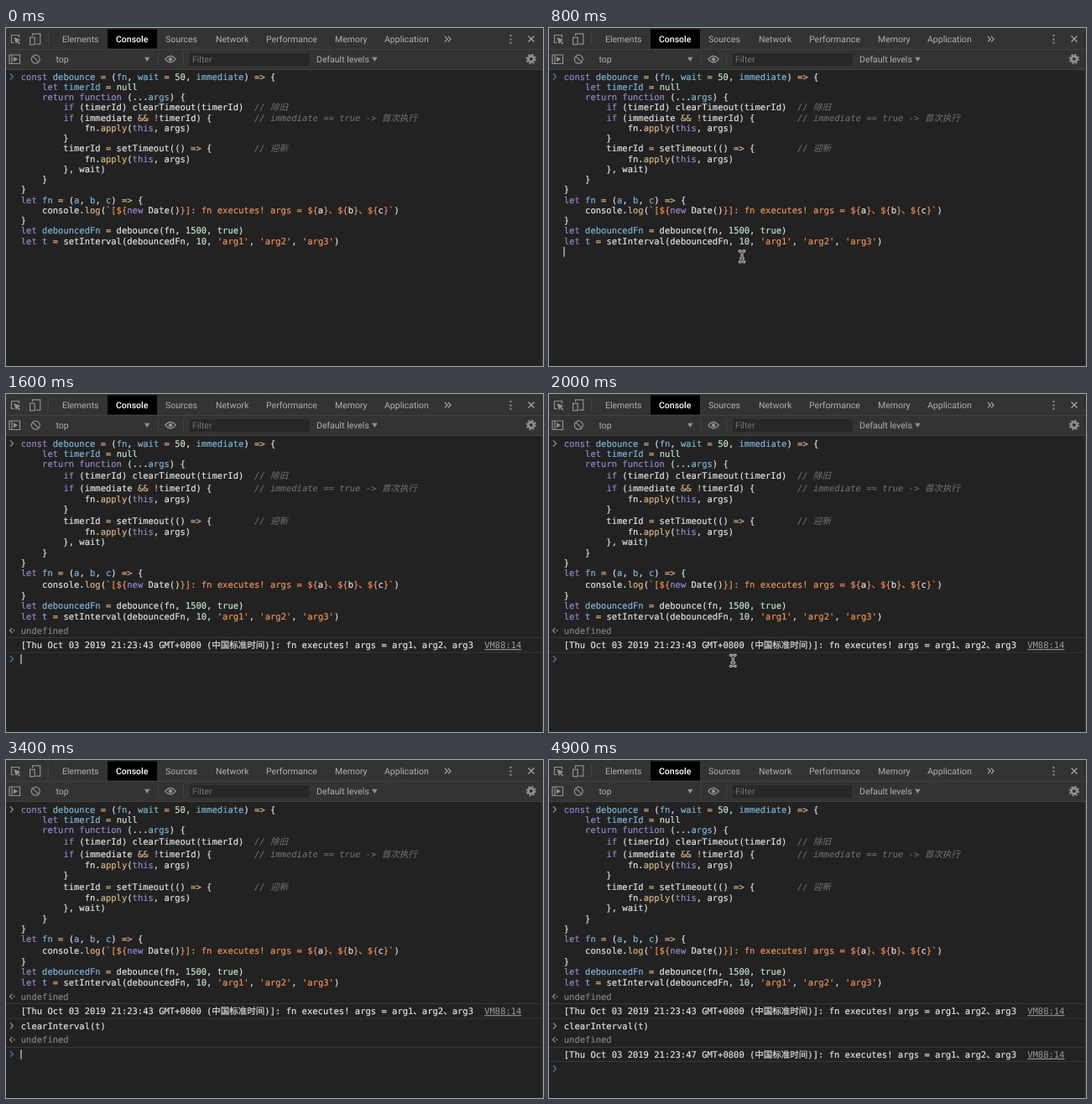
These frames come from a looping animation (640 by 403 pixels, 5000 ms). An HTML page:

```html
<!DOCTYPE html>
<html lang="zh-CN">
<head>
<meta charset="utf-8">
<title>Console</title>
<style>
html, body { margin: 0; width: 100%; height: 100%; overflow: hidden; background: #222; }
svg { display: block; width: 100%; height: 100%; }
text { white-space: pre; text-rendering: geometricPrecision; }
.bar text { font: 10.5px Roboto, sans-serif; fill: #b0b0b0; }
.bar .on { fill: #fff; font-weight: 500; }
.bar .dim { fill: #757575; }
.icon { fill: none; stroke: #919191; stroke-width: 1.2; }
.solid { fill: #919191; stroke: none; }
.mono text { font: 10.5px "DejaVu Sans Mono", "Noto Sans CJK SC", "Noto Sans CJK", monospace; color: #e2e2e2; }
.mono tspan { fill: currentColor; stroke: currentColor; stroke-width: .18px; }
.mono .k { color: #9a85cc; }
.mono .d { color: #7db4d8; }
.mono .n { color: #c4e6cc; }
.mono .o { color: #dab284; }
.mono .s { color: #ee9258; }
.mono .c { color: #747474; font-style: italic; stroke: none; }
.mono .u { color: #838383; }
.mono .l { color: #9c9c9c; text-decoration: underline; stroke: none; }
.rule { stroke: #383838; }
.chev { fill: none; stroke: #919191; stroke-width: 1.2; }
.live { stroke: #3f7cb4; }

.editor, .sent, .fresh, .out, .typed, .match, .done, .again, .prompt, .pen, .caret, .mouse {
  animation: 5s step-end infinite;
}
.editor { animation-name: editor; }
.sent { animation-name: sent; }
.fresh { animation-name: fresh; }
.out { animation-name: out; }
.typed { animation-name: typed; }
.match { animation-name: match; }
.done { animation-name: done; }
.again { animation-name: again; }
.prompt { animation-name: prompt; }
.pen { animation-name: pen; }
.caret { animation-name: blink; }
.mouse { animation-name: mouse; }

@keyframes editor { 0% { opacity: 1 } 23.8%, 100% { opacity: 0 } }
@keyframes sent { 0% { opacity: 0 } 23.8%, 100% { opacity: 1 } }
@keyframes fresh { 0% { opacity: 0 } 23.8% { opacity: 1 } 25.8%, 100% { opacity: 0 } }
@keyframes out { 0% { opacity: 0 } 25.8%, 100% { opacity: 1 } }
@keyframes typed { 0% { opacity: 0 } 43.8% { opacity: 1 } 67.8%, 100% { opacity: 0 } }
@keyframes match { 0% { opacity: 0 } 53% { opacity: 1 } 67.8%, 100% { opacity: 0 } }
@keyframes done { 0% { opacity: 0 } 67.8%, 100% { opacity: 1 } }
@keyframes again { 0% { opacity: 0 } 97.8%, 100% { opacity: 1 } }
@keyframes prompt {
  0% { transform: translateY(58px) }
  23.8% { transform: translateY(282px) }
  25.8% { transform: translateY(316px) }
  67.8% { transform: translateY(350.5px) }
  97.8%, 100% { transform: translateY(368px) }
}
@keyframes pen {
  0% { transform: translate(379.2px, 254px) }
  12% { transform: translate(0, 266.5px) }
  23.8% { transform: translate(0, 282px) }
  25.8% { transform: translate(0, 316px) }
  43.8% { transform: translate(0, 316px); animation-timing-function: steps(16, end) }
  53% { transform: translate(101.1px, 316px) }
  67.8% { transform: translate(0, 350.5px) }
  97.8%, 100% { transform: translate(0, 368px) }
}
@keyframes blink {
  0%, 10%, 22%, 33.8%, 63%, 77.8%, 97.8%, 100% { opacity: 0 }
  2%, 12%, 23.8%, 43.8%, 67.8%, 87.8% { opacity: 1 }
}
@keyframes mouse {
  0% { opacity: 0; transform: translate(230px, 272.5px) }
  8% { opacity: 1; transform: translate(230px, 272.5px) }
  23.8% { opacity: 0; transform: translate(219.3px, 318px) }
  38% { opacity: 1; transform: translate(219.3px, 318px) }
  67.8%, 100% { opacity: 0; transform: translate(219.3px, 318px) }
}
</style>
</head>
<body>
<svg viewBox="0 0 640 403">
  <rect width="640" height="403" fill="#222"/>

  <g class="bar">
    <rect width="640" height="49" fill="#333"/>
    <rect x="121" y="1.5" width="59" height="23" fill="#000"/>
    <path d="M0 25.5H640M0 49.5H640" stroke="#414141"/>
    <path d="M50.5 6V20M181.5 30V44M211.5 30V44" stroke="#424242"/>
    <rect x="219" y="30" width="142.5" height="15" fill="#272727"/>

    <text x="67" y="17">Elements</text>
    <text x="131" y="17" class="on">Console</text>
    <text x="190" y="17">Sources</text>
    <text x="250" y="17">Network</text>
    <text x="310" y="17">Performance</text>
    <text x="392" y="17">Memory</text>
    <text x="451" y="17">Application</text>
    <text x="59.5" y="40.5">top</text>
    <text x="222" y="41" class="dim">Filter</text>
    <text x="370" y="40.5">Default levels</text>

    <g class="icon">
      <path d="M9.5 17.5H6.5V8.5H15.5V11.5"/>
      <path class="solid" d="M9.5 11L17.5 14.3L14.4 15.4L17 18.3L15.8 19.4L13.2 16.6L12 19.6Z"/>
      <path d="M31.5 9.5V6.8H40.8V19.2H35.8"/>
      <rect x="28.6" y="11.3" width="5.6" height="8.4"/>
      <path d="M523 10L526 13.2L523 16.4M527 10L530 13.2L527 16.4" style="stroke:#a8a8a8"/>
      <path d="M622.5 9.5L629.5 16.5M629.5 9.5L622.5 16.5" style="stroke:#a8a8a8"/>
      <path class="solid" d="M600.5 8H602.5V10H600.5ZM600.5 12.4H602.5V14.4H600.5ZM600.5 16.8H602.5V18.8H600.5Z"/>
      <path d="M4 32H16.5V42.5H4ZM7 32V42.5"/>
      <path class="solid" d="M9 34.2L14.2 37.2L9 40.2Z"/>
      <circle cx="35.3" cy="37.2" r="5"/>
      <path d="M31.8 33.7L38.8 40.7"/>
      <path class="solid" d="M165 34.8H171.5L168.2 40ZM436.2 34.8H442.7L439.4 40Z"/>
      <path d="M189.8 37.2Q196 29.5 202.2 37.2Q196 44.9 189.8 37.2Z"/>
      <circle cx="196" cy="37.2" r="2.2" class="solid"/>
      <circle cx="625.8" cy="37" r="3.4" style="stroke-width:2.6"/>
      <circle cx="625.8" cy="37" r="5.3" style="stroke-width:1.8;stroke-dasharray:2.08 2.08"/>
    </g>
  </g>
  <rect x="638.5" y="50" width="1.5" height="353" fill="#363636"/>

  <g class="mono">
    <g class="editor" id="editor"></g>
    <g class="sent" id="sent">
      <path class="chev" d="M5 55.5L8.5 59L5 62.5"/>
    </g>
    <path class="fresh rule" d="M0 272.5H638"/>
    <g class="out" id="out">
      <path class="rule" d="M0 290.5H638M0 308.2H638"/>
    </g>
    <g class="typed" id="typed"></g>
    <path class="match" d="M100.2 322H105.8M112.8 322H118.4" stroke="#b0b0b0"/>
    <g class="done" id="done">
      <path class="chev" d="M5 313.5L8.5 317L5 320.5"/>
      <path class="rule" d="M0 342.5H638"/>
    </g>
    <g class="again" id="again">
      <path class="rule" d="M0 359.5H638"/>
    </g>
  </g>

  <path class="prompt chev live" d="M5 -3.5L8.5 0L5 3.5"/>
  <g class="pen">
    <rect x="18" y="-6" width="110" height="13" fill="#222"/>
    <rect class="caret" x="17.4" y="-5.8" width="1.2" height="12" fill="#d0d0d0"/>
  </g>
  <g class="mouse" fill="none" stroke-linecap="round">
    <path id="beam" d="M-3 -6.5Q0 -6.5 0 -4.4Q0 -6.5 3 -6.5M0 -4.6V4.6M-3 6.5Q0 6.5 0 4.4Q0 6.5 3 6.5M-1.5 2.4H1.5" stroke="#e0e0e0" stroke-width="2.8"/>
    <path d="M-3 -6.5Q0 -6.5 0 -4.4Q0 -6.5 3 -6.5M0 -4.6V4.6M-3 6.5Q0 6.5 0 4.4Q0 6.5 3 6.5M-1.5 2.4H1.5" stroke="#222"/>
  </g>
</svg>
<script>
// §xword§ colours a word with class x
const code = String.raw`§kconst§ §ddebounce§ §o=§ (§dfn§, §dwait§ §o=§ §n50§, §dimmediate§) §o=>§ {
    §klet§ §dtimerId§ §o=§ §nnull§
    §kreturn§ §kfunction§ (...§dargs§) {
        §kif§ (timerId) clearTimeout(timerId)  §c// 除旧§
        §kif§ (immediate §o&&§ §o!§timerId) {        §c// immediate == true -> 首次执行§
            fn.§oapply§(§kthis§, args)
        }
        timerId §o=§ setTimeout(() §o=>§ {        §c// 迎新§
            fn.§oapply§(§kthis§, args)
        }, wait)
    }
}
§klet§ §dfn§ §o=§ (§da§, §db§, §dc§) §o=>§ {
    console.§olog§(§s~[$\{§§knew§ Date()§s}]: fn executes! args = $\{§a§s}、$\{§b§s}、$\{§c§s}~§)
}
§klet§ §ddebouncedFn§ §o=§ debounce(fn, §n1500§, §ntrue§)
§klet§ §dt§ §o=§ setInterval(debouncedFn, §n10§, §s'arg1'§, §s'arg2'§, §s'arg3'§)`
  .replace(/\\/g, '').replace(/~/g, '`').split('\n');

const NS = 'http://www.w3.org/2000/svg';
const add = (parent, tag, attrs) => {
  const el = document.createElementNS(NS, tag);
  for (const k in attrs) el.setAttribute(k, attrs[k]);
  return parent.appendChild(el);
};
const row = (id, mid, line, x = 17.8) => {
  const text = add(document.getElementById(id), 'text', { x, y: mid + 3.7 });
  line.split('§').forEach((part, i) => {
    if (!part) return;
    const span = add(text, 'tspan', i % 2 ? { class: part[0] } : {});
    span.textContent = i % 2 ? part.slice(1) : part;
  });
};
const log = (id, mid, sec) => {
  row(id, mid, `[Thu Oct 03 2019 21:23:${sec} GMT+0800 (中国标准时间)]: fn executes! args = arg1、arg2、arg3`);
  row(id, mid, '§lVM88:14§', 570.2);
};
const result = (id, mid) => {
  row(id, mid, '§uundefined§');
  const g = document.getElementById(id);
  add(g, 'path', { class: 'chev', d: `M7.5 ${mid - 3}L4.5 ${mid}L7.5 ${mid + 3}` });
  add(g, 'circle', { cx: 9.6, cy: mid, r: 0.9, class: 'solid' });
};

// Sent lines holding Chinese glyphs are a little taller
let extra = 0;
code.forEach((line, i) => {
  const tall = /[\u3000-\u9fff]/.test(line);
  if (tall) extra += 2.5;
  row('editor', 58 + i * 12.25, line);
  row('sent', 59 + i * 12.25 + extra - (tall ? 1.2 : 0), line);
});
result('out', 282);
log('out', 299.5, 43);
row('typed', 316, 'clearInterval(t)');
row('done', 317, 'clearInterval(t)');
result('done', 333.5);
log('again', 351.2, 47);
</script>
</body>
</html>
```
